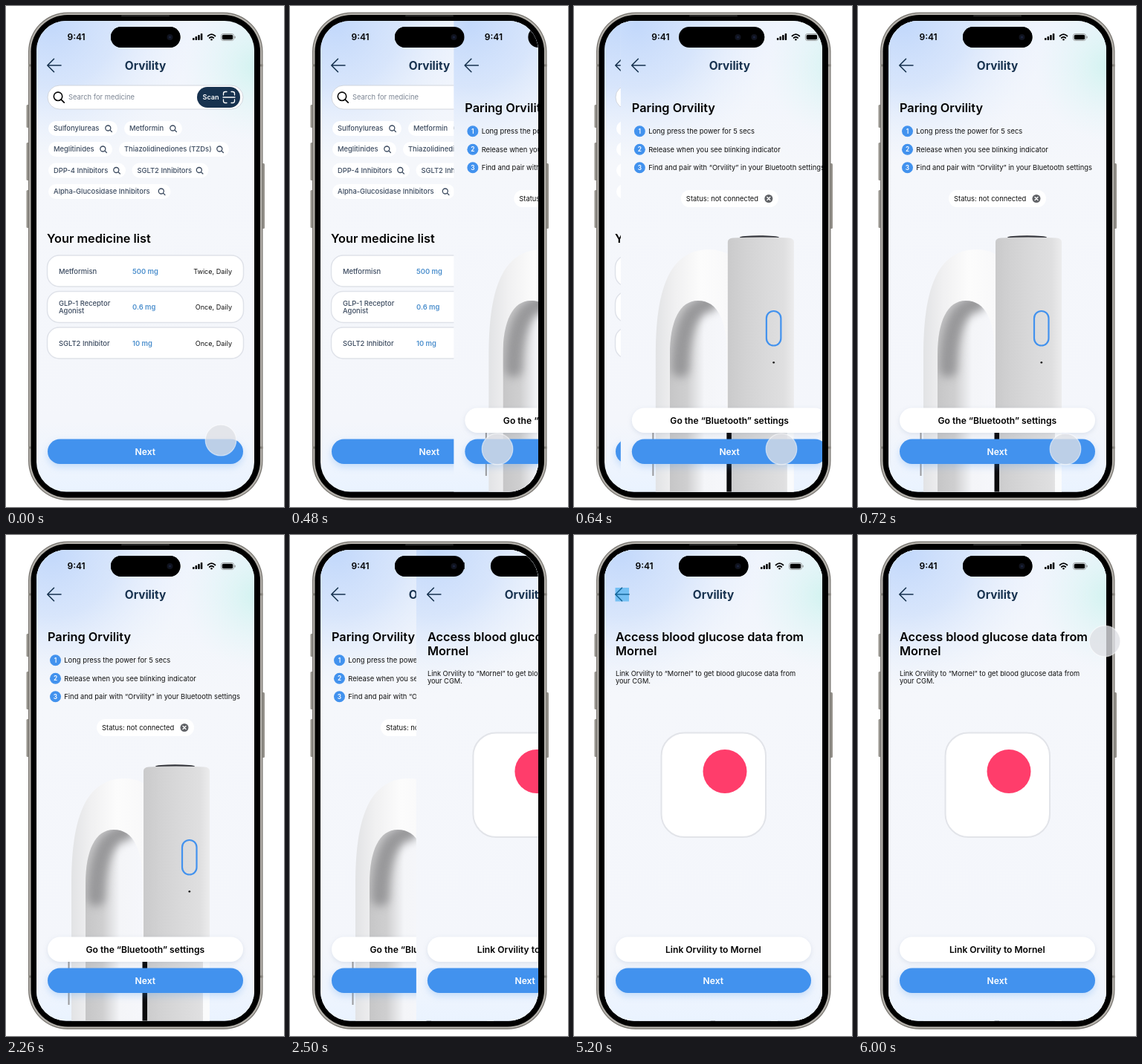
Recreate the animation shown at these times as an HTML page. Size 374 by 675 pixels, loop 6.04 s.

```html
<!DOCTYPE html>
<html lang="en">
<head>
<meta charset="utf-8">
<title>Medicine app onboarding</title>
<style>
  html, body { margin: 0; height: 100%; overflow: hidden; background: #fff; }
  svg { display: block; width: 100vw; height: 100vh; }
  text { font-family: Inter, "Open Sans", sans-serif; white-space: pre; }
  .soft { filter: drop-shadow(0 2px 3px rgba(60, 90, 140, .13)); }
  .glow { filter: drop-shadow(0 4px 5px rgba(66, 146, 240, .25)); }
  .blur { filter: blur(6px); }
</style>
</head>
<body>
<svg viewBox="0 0 374 675" xmlns="http://www.w3.org/2000/svg">
  <defs>
    <clipPath id="display"><rect x="41" y="20" width="293" height="634.5" rx="40"/></clipPath>
    <clipPath id="opening"><path d="M107 655V470C107 425 120 397 145 397C172 397 184 425 184 470V655Z"/></clipPath>
    <linearGradient id="base" x2="0" y2="1">
      <stop offset="0" stop-color="#eff4fd"/><stop offset=".3" stop-color="#f5f7fb"/>
      <stop offset=".85" stop-color="#f4f6fb"/><stop offset="1" stop-color="#eaf3ff"/>
    </linearGradient>
    <radialGradient id="sky" gradientUnits="userSpaceOnUse" cx="62" cy="24" r="190">
      <stop offset="0" stop-color="#c2d8fb"/><stop offset=".45" stop-color="#cfe0fb" stop-opacity=".75"/>
      <stop offset="1" stop-color="#e8f0fc" stop-opacity="0"/>
    </radialGradient>
    <radialGradient id="mint" gradientUnits="userSpaceOnUse" cx="338" cy="82" r="100">
      <stop offset="0" stop-color="#d2f3f0"/><stop offset="1" stop-color="#e4f6f7" stop-opacity="0"/>
    </radialGradient>
    <linearGradient id="barrel" x2="1" y2="0">
      <stop offset="0" stop-color="#cacacb"/><stop offset=".25" stop-color="#d2d2d3"/>
      <stop offset=".6" stop-color="#dadadb"/><stop offset=".85" stop-color="#dfdfe0"/>
      <stop offset="1" stop-color="#ececed"/>
    </linearGradient>
    <linearGradient id="handle" x2="1" y2="0">
      <stop offset="0" stop-color="#e2e3e5"/><stop offset=".25" stop-color="#f0f0f1"/>
      <stop offset=".6" stop-color="#fcfcfc"/><stop offset="1" stop-color="#f8f8f9"/>
    </linearGradient>
    <linearGradient id="hollow" x2="1" y2="0">
      <stop offset="0" stop-color="#c6c6c7"/><stop offset=".3" stop-color="#cfcfd0"/>
      <stop offset=".6" stop-color="#f4f5f8"/><stop offset="1" stop-color="#f6f7fb"/>
    </linearGradient>
  </defs>

  <g fill="#96938c">
    <rect x="27.500" y="133" width="4" height="31" rx="1.500"/>
    <rect x="27.500" y="184" width="4" height="51" rx="1.500"/>
    <rect x="27.500" y="248" width="4" height="51" rx="1.500"/>
    <rect x="344" y="212" width="4" height="88" rx="1.500"/>
  </g>
  <rect x="30" y="8.500" width="315.500" height="657.500" rx="53" fill="#77746f"/>
  <rect x="31.200" y="9.700" width="313.100" height="655.100" rx="51.800" fill="#b4b1ab"/>
  <path d="M30 80h4M341 80h4.500M30 595h4M341 595h4.500" stroke="#85827b" stroke-width="3"/>
  <rect x="33.500" y="12" width="308.500" height="650.500" rx="49.500" fill="#000"/>
  <rect x="155" y="12.500" width="65" height="1.500" rx=".7" fill="#333"/>
  <g clip-path="url(#display)">
    <g id="medicines"></g>
    <g id="pairing"></g>
    <g id="access"></g>
    <rect id="hint" x="55.500" y="71" width="18.500" height="18.500" fill="#18a0eb"/>
  </g>
  <g id="notch"></g>
  <circle id="touch" r="20.800" fill="#dfe1e6" fill-opacity=".78" stroke="#fff" stroke-opacity=".55" stroke-width="1.200"/>
</svg>

<script>
const APP = 'Orvility', SOURCE = 'Mornel';
const NAVY = '#17324f', SLATE = '#3b4a5f', BLUE = '#4292ee';
const LOOP = 6040, TICK = 20, PUSH = 300, WIDTH = 293;
const byId = id => document.getElementById(id);

const text = (x, y, str, { size = 9.4, weight = 400, fill = '#111', anchor = 'start' } = {}) =>
  `<text x="${x}" y="${y}" font-size="${size}" font-weight="${weight}" fill="${fill}" text-anchor="${anchor}">${str}</text>`;

const box = (x, y, w, h, r, fill, extra = '') =>
  `<rect x="${x}" y="${y}" width="${w}" height="${h}" rx="${r}" fill="${fill}" ${extra}/>`;

const line = (d, color, width, extra = '') =>
  `<path d="${d}" fill="none" stroke="${color}" stroke-width="${width}" stroke-linecap="round" stroke-linejoin="round" ${extra}/>`;

const lens = (x, y, r, color, width) =>
  `<circle cx="${x}" cy="${y}" r="${r}" fill="none" stroke="${color}" stroke-width="${width}"/>` +
  line(`M${x + r * .75} ${y + r * .75}l${r * .7} ${r * .7}`, color, width);

const heading = (y, str, x = 56) => text(x, y, str, { size: 16.3, weight: 600, fill: '#000' });

const button = (y, label, primary) =>
  box(56, y, 263, 33.5, 16.7, primary ? BLUE : '#fff', `class="${primary ? 'glow' : 'soft'}"`) +
  text(187.3, y + 21, label, { size: 12.1, weight: 600, fill: primary ? '#fff' : '#000', anchor: 'middle' });

const island = box(141, 28, 93.5, 28, 14, '#000') +
  '<circle cx="220.5" cy="42" r="4" fill="#10131f"/><circle cx="220.5" cy="42" r="1.5" fill="#1c2540"/>';

function statusBar() {
  const bars = [3, 5, 7, 9].map((h, i) => box(251 + i * 3.6, 46 - h, 2.5, h, .7, '#000')).join('');
  return text(82.5, 46, '9:41', { size: 12, weight: 600, fill: '#000' }) + island + bars +
    line('M271.5 40.5q5-4.6 10 0M273.7 43q2.8-2.5 5.6 0', '#000', 1.7) +
    '<circle cx="276.5" cy="45.3" r="1.2"/>' +
    box(289.5, 37.5, 17, 9, 2.7, 'none', 'stroke="#888" stroke-width=".8"') +
    box(290.8, 38.8, 14.4, 6.4, 1.6, '#000') + box(307.5, 40.5, 1.2, 3, .6, '#888');
}

const page = content =>
  ['base', 'sky', 'mint'].map(id => box(41, 20, WIDTH, 635, 0, `url(#${id})`)).join('') +
  content + statusBar() +
  line('M74 80H56M64.5 71.3L55.8 80L64.5 88.7', NAVY, 1.6) +
  text(187.5, 86, APP, { size: 15.4, weight: 700, fill: NAVY, anchor: 'middle' });

const chip = ([x, y, label, icon]) =>
  box(x - 7, y - 10, icon - x + 19, 20, 10, '#fff') +
  text(x, y + 3.2, label, { weight: 500, fill: SLATE }) +
  lens(icon - .7, y - .5, 3.5, SLATE, 1.3);

const medicine = ([name, dose, times], i) => {
  const top = 336 + i * 48.5, mid = top + 24.5;
  const names = name.split('|');
  return box(55.5, top, 264, 42, 16, '#fff', 'stroke="#dfe2e9" stroke-width="1.5"') +
    names.map((part, k) =>
      text(71, mid + (k - (names.length - 1) / 2) * 10.5, part, { weight: 500, fill: SLATE })).join('') +
    text(170, mid, dose, { weight: 600, fill: '#4c8fcd' }) +
    text(304, mid, times, { size: 9.1, anchor: 'end' });
};

byId('notch').innerHTML = island;

byId('medicines').innerHTML = page(
  box(56, 107, 263, 32, 16, '#fff', 'stroke="#cdd2da" stroke-width=".9"') +
  lens(70, 121.8, 5.7, '#000', 1.6) +
  text(84, 126.3, 'Search for medicine', { fill: '#7c8593' }) +
  box(257, 109, 58, 28, 14, NAVY) +
  text(264.5, 126.3, 'Scan', { size: 9.1, weight: 600, fill: '#fff' }) +
  line('M292.5 120v-2q0-2.5 2.5-2.5h2M303 115.5h2q2.5 0 2.5 2.5v2M307.5 126v2q0 2.5-2.5 2.5h-2' +
    'M297 130.5h-2q-2.5 0-2.5-2.5v-2M292 123h16', '#fff', 1.3) +
  [
    [64, 165, 'Sulfonylureas', 138], [166, 165, 'Metformin', 225],
    [64, 193, 'Meglitinides', 131], [159, 193, 'Thiazolidinediones (TZDs)', 288],
    [64, 221.5, 'DPP-4 Inhibitors', 149], [176.5, 221.5, 'SGLT2 Inhibitors', 260.5],
    [64, 250, 'Alpha-Glucosidase Inhibitors', 209.5]
  ].map(chip).join('') +
  heading(318.5, 'Your medicine list', 55) +
  [
    ['Metformisn', '500 mg', 'Twice, Daily'],
    ['GLP-1 Receptor|Agonist', '0.6 mg', 'Once, Daily'],
    ['SGLT2 Inhibitor', '10 mg', 'Once, Daily']
  ].map(medicine).join('') +
  button(583.5, 'Next', true)
);

const device =
  '<path d="M88 655V470C88 385 105 328 160 328Q176 328 190 337V655Z" fill="url(#handle)"/>' +
  '<g clip-path="url(#opening)">' + box(107, 397, 77, 258, 0, 'url(#hollow)') +
  line('M160 400C136 404 122 432 121 488', '#98989a', 24, 'class="blur"') + '</g>' +
  '<path d="M84.5 575v58" stroke="#9a9a9c" stroke-width="2"/>' +
  '<ellipse cx="227.5" cy="311.5" rx="26.5" ry="2.2" fill="#33343a"/>' +
  '<path d="M185 655V318Q185 313 192 312.5Q228 310.5 267 312.5Q274 313 274 318V655Z" fill="url(#barrel)"/>' +
  box(183.5, 570, 6.5, 85, 0, '#0b0b0d') + box(265, 570, 9, 85, 0, '#fafbfc') +
  box(237, 411, 19.5, 46.5, 9.7, 'none', `stroke="${BLUE}" stroke-width="2.2"`) +
  '<circle cx="246.8" cy="480.3" r="1.4" fill="#222"/>';

byId('pairing').innerHTML = page(
  device +
  heading(143, `Paring ${APP}`) +
  ['Long press the power for 5 secs', 'Release when you see blinking indicator',
    `Find and pair with “${APP}” in your Bluetooth settings`].map((step, i) => {
    const y = 168.7 + i * 24.5;
    return `<circle cx="66.5" cy="${y}" r="7.5" fill="${BLUE}"/>` +
      text(66.5, y + 3, i + 1, { size: 8.4, weight: 600, fill: '#fff', anchor: 'middle' }) +
      text(78.3, y + 3.3, step);
  }).join('') +
  box(122, 248, 131, 23, 11.5, '#fff') +
  text(129, 263, 'Status: not connected') +
  '<circle cx="240" cy="259.5" r="5.5" fill="#606266"/>' +
  line('M238 257.5l4 4M242 257.5l-4 4', '#fff', 1.3) +
  button(541.5, 'Go the “Bluetooth” settings') +
  button(583.5, 'Next', true)
);

byId('access').innerHTML = page(
  heading(143, 'Access blood glucose data from') + heading(161.7, SOURCE) +
  text(56, 190, `Link ${APP} to “${SOURCE}” to get blood glucose data from`, { size: 9.3 }) +
  text(56, 200.3, 'your CGM.', { size: 9.3 }) +
  box(117.5, 266.5, 140.5, 140.5, 31, '#fff', 'stroke="#e2e4e9" stroke-width="2"') +
  '<circle cx="203" cy="318.5" r="29.5" fill="#ff3d6b"/>' +
  button(541.5, `Link ${APP} to ${SOURCE}`) +
  button(583.5, 'Next', true)
);

const clamp = v => Math.min(1, Math.max(0, v));
const easeOut = p => 1 - (1 - clamp(p)) ** 1.68;

function slideIn(id, t, start) {
  const el = byId(id);
  el.setAttribute('transform', `translate(${WIDTH * (1 - easeOut((t - start) / PUSH))} 0)`);
  el.style.display = t > start ? '' : 'none';
}

function touchAt(t) {
  if (t < 2260) {
    const p = easeOut(t / 240);
    return [289 - 10 * p, 585 + 12 * p];
  }
  return t >= 5840 ? [332, 326 - 183 * (t - 5840) / 160] : null;
}

function draw() {
  const t = Math.floor(performance.now() % LOOP / TICK) * TICK;
  slideIn('pairing', t, 404);
  slideIn('access', t, 2384);
  byId('hint').setAttribute('opacity', t < 5200 ? 0 : .5 * clamp((5840 - t) / 640));
  const spot = touchAt(t), touch = byId('touch');
  touch.style.display = spot ? '' : 'none';
  if (spot) touch.setAttribute('transform', `translate(${spot})`);
  requestAnimationFrame(draw);
}
draw();
</script>
</body>
</html>
```
